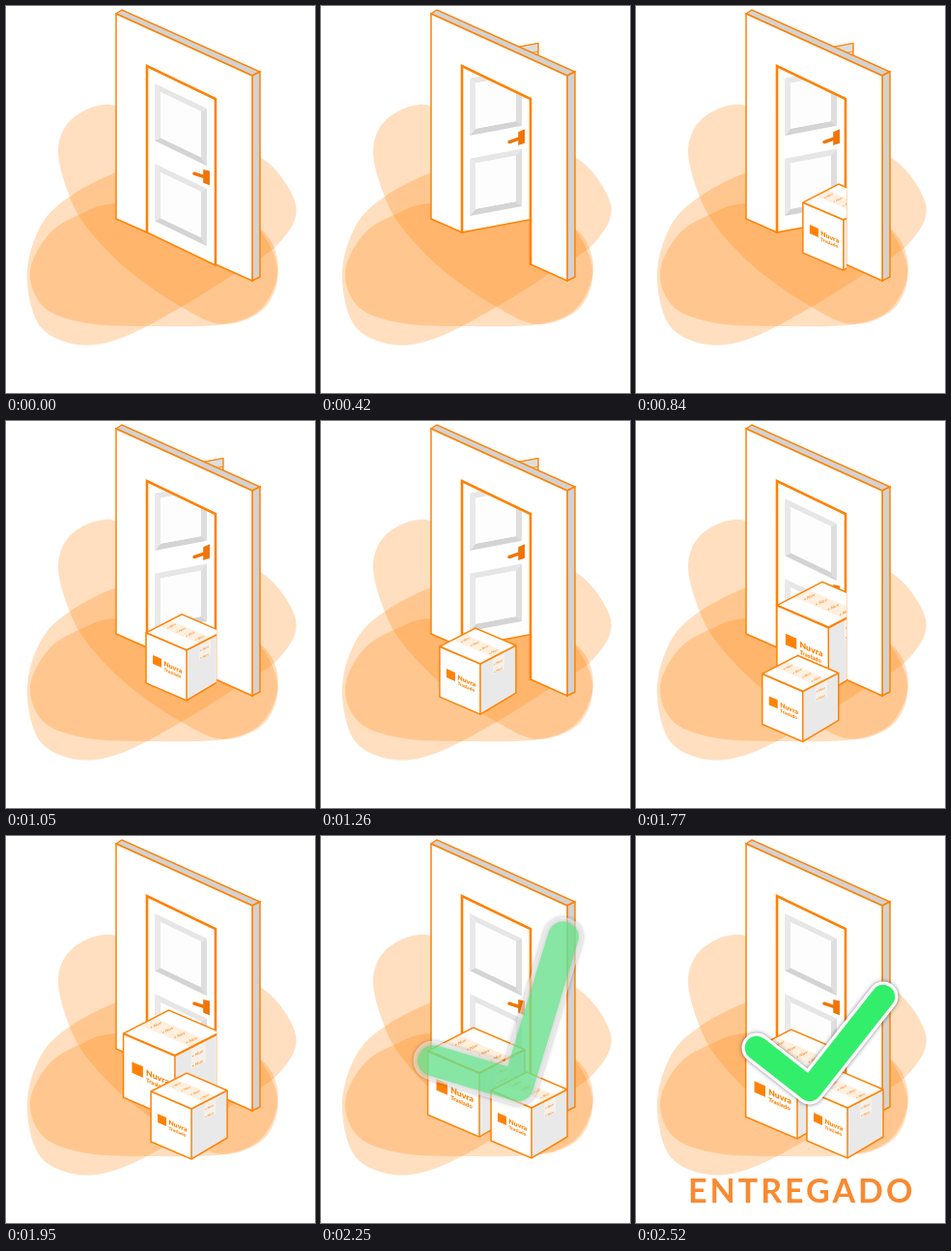
Write an HTML page with a canvas that moves like this. It is 320 by 400 pixels and loops after 3.75 s.

```html
<!DOCTYPE html>
<html lang="es">
<head>
<meta charset="utf-8">
<title>Entregado</title>
<style>
  html, body { margin: 0; height: 100%; overflow: hidden; background: #fff; }
  canvas { display: block; }
</style>
</head>
<body>
<canvas id="stage" width="320" height="400"></canvas>
<script>
const ctx = document.getElementById('stage').getContext('2d');
const LOOP = 3750, ORANGE = '#ff8204';

const clamp = v => Math.max(0, Math.min(1, v));
const smooth = v => v * v * (3 - 2 * v);
const ramp = (t, from, to) => clamp((t - from) / (to - from));

function poly(points, fill, stroke, width = 1.5) {
  ctx.beginPath();
  points.forEach(p => ctx.lineTo(p[0], p[1]));
  ctx.closePath();
  if (fill) { ctx.fillStyle = fill; ctx.fill(); }
  if (stroke) { ctx.strokeStyle = stroke; ctx.lineWidth = width; ctx.stroke(); }
}

function line(points, color, width) {
  ctx.beginPath();
  points.forEach(p => ctx.lineTo(p[0], p[1]));
  ctx.strokeStyle = color;
  ctx.lineWidth = width;
  ctx.stroke();
}

// Smooth path through timed points [ms, x, y]
function follow(keys, t) {
  const at = i => keys[Math.max(0, Math.min(keys.length - 1, i))];
  if (t >= at(keys.length).at(0)) return at(keys.length).slice(1);
  let i = 0;
  while (keys[i + 1][0] < t) i++;
  const a = at(i), b = at(i + 1), span = b[0] - a[0], u = clamp((t - a[0]) / span);
  const slope = (k, c) => (at(k + 1)[c] - at(k - 1)[c]) / (at(k + 1)[0] - at(k - 1)[0]) * span;
  return [1, 2].map(c =>
    a[c] + (b[c] - a[c]) * smooth(u) +
    slope(i, c) * u * (1 - u) ** 2 - slope(i + 1, c) * u * u * (1 - u));
}

const blobs = [
  [[95,103],[65,120],[54,150],[64,192],[83,228],[125,272],[180,310],[225,329],[268,312],[281,270],[255,220],[190,150],[125,108]],
  [[22,285],[30,240],[55,205],[114,172],[200,148],[263,156],[300,205],[283,245],[235,278],[180,312],[120,343],[75,350],[36,332]],
  [[25,275],[45,235],[80,214],[114,204],[200,205],[263,230],[282,270],[265,312],[225,329],[150,331],[85,328],[40,312]]
];

function blob(pts) {
  const n = pts.length, at = i => pts[(i + n) % n];
  ctx.beginPath();
  ctx.moveTo(...pts[0]);
  for (let i = 0; i < n; i++) {
    const [a, b, c, d] = [at(i - 1), at(i), at(i + 1), at(i + 2)];
    ctx.bezierCurveTo(b[0] + (c[0] - a[0]) / 6, b[1] + (c[1] - a[1]) / 6,
                      c[0] - (d[0] - b[0]) / 6, c[1] - (d[1] - b[1]) / 6, c[0], c[1]);
  }
  ctx.fillStyle = 'rgba(255,128,0,.25)';
  ctx.fill();
}

// The door turns about its left edge; open runs from 0 to 1
function door(open) {
  const turn = open * Math.PI / 3, c = Math.cos(turn), s = Math.sin(turn);
  const dx = 71 * c + 41 * s, dy = 34 * c - 35 * s;
  const at = (u, v) => [146 + u * dx, 62 + u * dy + 172 * v];
  const far = 1 + .11 * open, top = -.05 * open;
  poly([at(0, top), at(far, top), at(far, 1), at(0, 1)], '#fff', ORANGE);
  if (open) poly([at(0, top), at(far, top), at(far, 0), at(0, 0)], '#dcdedd', ORANGE, 1);

  for (const [v0, v1] of [[.083, .427], [.565, .91]]) {
    const u0 = .113, u1 = .873, m = .085, n = .035;
    const out = [at(u0, v0), at(u1, v0), at(u1, v1), at(u0, v1)];
    const inn = [at(u0 + m, v0 + n), at(u1 - m, v0 + n), at(u1 - m, v1 - n), at(u0 + m, v1 - n)];
    ['#e6e6e6', '#dedede', '#d4d4d4', '#e9e9e9'].forEach((shade, i) => {
      const j = (i + 1) % 4;
      poly([out[i], out[j], inn[j], inn[i]], shade);
    });
    poly(inn, '#fdfdfd');
  }

  poly([at(.82, .46), at(.915, .45), at(.915, .535), at(.82, .54)], '#f27405');
  ctx.lineCap = 'round';
  line([at(.69, .51), at(.85, .5)], '#f27405', 3.5);
  ctx.lineCap = 'butt';
}

function wall() {
  poly([[114,8],[120,4],[263,68],[255,72]], '#d2d2d2', ORANGE);
  poly([[255,72],[263,68],[263,280],[255,284]], '#d2d2d2', ORANGE);
  poly([[114,8],[255,72],[255,284],[217,267],[217,96],[146,62],[146,234],[114,220]], '#fff', ORANGE);
  line([[146,235],[146,62],[217,96],[217,268]], ORANGE, 2.6);
}

// Runs draw() in the sheared plane of a box side
function onFace(x, y, shear, draw) {
  ctx.save();
  ctx.transform(1, shear, 0, 1, x, y);
  draw();
  ctx.restore();
}

function label(text, x, y, size) {
  ctx.font = `900 ${size}px Lato, sans-serif`;
  ctx.fillText(text, x, y);
}

// x, y is the lowest corner
function box([x, y], scale, edge, clipped) {
  ctx.save();
  if (clipped) {
    ctx.beginPath();
    ctx.rect(0, 0, 218, 400);
    ctx.clip();
  }
  ctx.translate(x, y);
  ctx.scale(scale, scale);
  const front = [0, -52], left = [-42, -70], right = [37, -71], back = [-5, -89];
  const w = 1.5 / scale;
  const top = (a, b) => [-42 + 42 * a + 37 * b, -70 + 18 * a - 19 * b];
  poly([left, back, right, front], '#fff');
  poly([left, front, [0, 0], [-42, -18]], '#fff');
  poly([front, right, [37, -22], [0, 0]], '#e9e9e9');

  poly([top(0, .36), top(0, .68), top(1, .68), top(1, .36)], '#fff0e0');
  poly([top(1, .36), top(1, .68), [25, -47], [13, -41]], '#f6f0ea');
  ctx.fillStyle = '#f9a452';
  for (let i = 0; i < 4; i++) {
    const p = top(.2 + i * .23, .37);
    onFace(p[0], p[1], -.5, () => label('▪ Nuv', 0, 0, 3.6));
  }
  onFace(...front, -.51, () => {
    label('▪ Nuv', 14, 9, 3.6);
    label('▪ Nuv', 14, 17, 3.6);
  });

  ctx.fillStyle = ORANGE;
  onFace(...left, .43, () => {
    ctx.fillRect(7, 20, 9, 9);
    label('Nuvra', 18.5, 26, 6.8);
    label('Traslado', 18.5, 31.5, 4.7);
  });

  poly([left, back, right, [37, -22], [0, 0], [-42, -18]], null, ORANGE, w);
  line([left, front, right], ORANGE, w * edge);
  line([front, [0, 0]], ORANGE, w);
  ctx.restore();
}

const smallPath = [[540,264,240],[840,215,273],[1260,165,303],[1560,155,325],[1950,192,334],[2250,218,333],[2520,219,333]];
const largePath = [[1300,276,238],[1560,234,262],[1950,175,293],[2250,164,311],[2520,167,313]];

function check(t) {
  const p = ramp(t, 2160, 2520), rest = 1 - p;
  if (!p) return;
  ctx.save();
  ctx.globalAlpha = Math.min(1, p * 2);
  ctx.translate(180 + 32 * rest, 262 - 5 * rest);
  ctx.rotate(-.5 * rest);
  ctx.scale(1 + .42 * rest, 1 + .42 * rest);
  ctx.lineCap = ctx.lineJoin = 'round';
  const tick = [[-55, -43], [0, 0], [76, -96]];
  ctx.shadowColor = 'rgba(0,0,0,.5)';
  ctx.shadowBlur = 4;
  line(tick, '#fff', 31);
  ctx.shadowColor = 'transparent';
  line(tick, '#33ee6b', 24.5);
  ctx.restore();
}

function caption(t) {
  ctx.save();
  ctx.globalAlpha = ramp(t, 2280, 2520);
  ctx.font = 'bold 34px Lato, sans-serif';
  ctx.letterSpacing = '3px';
  ctx.fillStyle = '#f98a30';
  ctx.fillText('ENTREGADO', 54, 379);
  ctx.restore();
}

function draw(t) {
  ctx.fillStyle = '#fff';
  ctx.fillRect(0, 0, 320, 400);
  blobs.forEach(blob);
  door(smooth(ramp(t, 180, 420)) - smooth(ramp(t, 1280, 1530)));
  wall();
  if (t >= 1300) box(follow(largePath, t), 1.27, 1.5, true);
  if (t >= 560) box(follow(smallPath, t), 1, 1.2, t < 1200);
  check(t);
  caption(t);
}

const start = performance.now();
function frame() {
  draw((performance.now() - start) % LOOP);
  requestAnimationFrame(frame);
}
frame();
</script>
</body>
</html>
```
